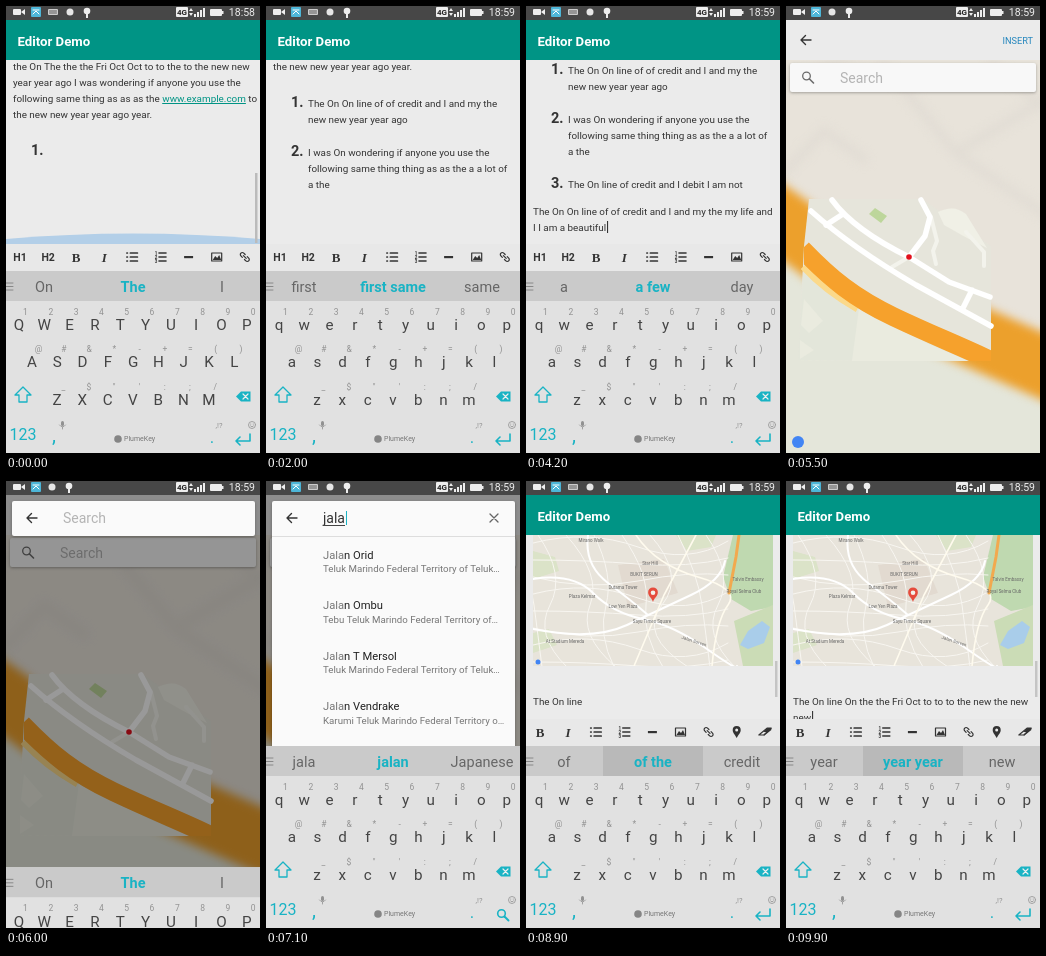
Recreate the animation shown at these times as an HTML page with a canvas. Size 254 by 447 pixels, loop 10 s.

```html
<!DOCTYPE html>
<html lang="en">
<head>
<meta charset="utf-8">
<title>Editor Demo</title>
<style>
html, body { margin: 0; width: 100%; height: 100%; overflow: hidden; background: #ebebeb; }
canvas { display: block; width: 100vw; height: 100vh; }
</style>
</head>
<body>
<canvas></canvas>
<script>
const W = 254, H = 447, LOOP = 10000, STEP = 100;
const TEAL = '#19b3c4', INK = '#333', GREY = '#929292';
const canvas = document.querySelector('canvas'), c = canvas.getContext('2d');
const dpr = window.devicePixelRatio || 1;
canvas.width = W * dpr;
canvas.height = H * dpr;

// ---- helpers ----
const clamp = v => Math.max(0, Math.min(1, v));
const span = (t, a, b) => clamp((t - a) / (b - a));

function rect(x, y, w, h, color, r = 0) {
  c.fillStyle = color;
  c.beginPath();
  c.roundRect(x, y, w, h, r);
  c.fill();
}
function dot(x, y, r, color) {
  c.fillStyle = color;
  c.beginPath();
  c.arc(x, y, r, 0, 7);
  c.fill();
}
function ring(x, y, r, color, width) {
  c.strokeStyle = color;
  c.lineWidth = width;
  c.beginPath();
  c.arc(x, y, r, 0, 7);
  c.stroke();
}
function fill(d, color) {
  c.fillStyle = color;
  c.fill(new Path2D(d));
}
function stroke(d, color, width = 1) {
  c.strokeStyle = color;
  c.lineWidth = width;
  c.stroke(new Path2D(d));
}
function at(x, y, draw, angle = 0, scale = 1) {
  c.save();
  c.translate(x, y);
  c.rotate(angle * Math.PI / 180);
  c.scale(scale, scale);
  draw();
  c.restore();
}
// y is the middle of the capital letters
function text(s, x, y, size, color = INK, align = 'left', style = '', family = 'Roboto, sans-serif') {
  c.font = `${style} ${size}px ${family}`;
  c.fillStyle = color;
  c.textAlign = align;
  c.fillText(s, x, y + size * .355);
}
const label = (s, x, y, angle, size = 6.5, color = '#555') =>
  at(x, y, () => text(s, 0, 0, size, color, 'center'), angle);
function clip(x, y, w, h, draw) {
  c.save();
  c.beginPath();
  c.rect(x, y, w, h);
  c.clip();
  draw();
  c.restore();
}
function typed(s, t, a, b) {
  const words = s.match(/\S+\s*/g);
  return words.slice(0, Math.round(words.length * span(t, a, b))).join('');
}

// ---- status bar ----
function statusBar(t, keys) {
  rect(0, 0, W, 14, '#474747');
  rect(7, 3, 8, 6, '#eee', 1);
  fill('M15 6l4-3v6z', '#eee');
  rect(25, 1, 10, 10, '#4db6d8', 1);
  stroke('M27 8l3-3 3 3M27 4h6', '#fff');
  if (keys) {
    rect(42, 3, 10, 6, '#ccc', 1);
    stroke('M43.500 5h7M43.500 7h7', '#333', .7);
  }
  const x = keys ? 64 : 46;
  dot(x, 6, 3.5, '#e6e6e6');
  dot(x + 17, 5, 3.3, '#eee');
  rect(x + 16, 6, 2, 6, '#eee');
  rect(170, 1, 12, 10, '#eee', 1);
  text('4G', 176, 6, 8, '#222', 'center', 'bold');
  fill('M183 5l2-3 2 3zM183 7h4l-2 3z', '#eee');
  for (let i = 0; i < 4; i++) rect(188 + i * 3, 8 - i * 2, 2, 3 + i * 2, '#eee');
  rect(204, 3, 12, 7, '#eee', 1);
  rect(216, 5, 1.5, 3, '#eee');
  text(t < 1200 ? '18:58' : '18:59', 249, 6, 10.5, '#eee', 'right');
}

// ---- keyboard ----
const hints = [
  ['On', 'The', 'I'], ['year', 'year year', 'new'], ['of', 'of the', 'credit'],
  ['a', 'a few', 'day'], ['first', 'first same', 'same'], ['and', 'I and', 'my']
];
const keyRows = [
  ['qwertyuiop', '1234567890', 13, 319],
  ['asdfghjkl', '@#&*-+=()', 26, 356],
  ['zxcvbnm', '_$"\':;/', 51, 394]
];
function lens(x, y, color, width) {
  ring(x - 1.5, y - 1.5, 3.8, color, width);
  at(x, y, () => stroke('M1.500 1.500L5.500 5.500', color, width + .3));
}
function keyboard(words, caps, { search = false, pressed = false } = {}) {
  rect(0, 265, W, 182, '#e1e1e1');
  rect(0, 265, W, 30, '#cacaca');
  if (pressed) rect(77, 265, 100, 30, '#b9b9b9');
  stroke('M0 277h7M0 280.500h7M0 284h7', '#888');
  words.forEach((s, i) =>
    text(s, 38 + i * 89, 281, 14.5, i == 1 ? TEAL : '#666', 'center', i == 1 ? 'bold' : ''));
  for (const [keys, alts, x, y] of keyRows)
    [...keys].forEach((k, i) => {
      const kx = x + i * 25.3;
      text(caps ? k.toUpperCase() : k, kx, y, 15.2, '#444', 'center');
      text(alts[i], kx + 6.5, y - 13.3, 8.5, GREY, 'center');
    });
  stroke('M17 381l-8 8h4v7h8v-7h4z', TEAL, 1.3);
  fill('M230 390.500l5-5h9.500v10h-9.500z', TEAL);
  stroke('M237 388l5 5M242 388l-5 5', '#eee', 1.2);
  text('123', 17, 428, 16, TEAL, 'center');
  text(',', 48, 429, 20, TEAL, 'center');
  rect(55, 415, 3, 5, GREY, 1.5);
  stroke('M53.500 419q3 4 6 0M56.500 421v2', GREY, .8);
  dot(112, 433, 3.8, '#858585');
  text('PlumeKey', 118, 433, 7, '#777');
  text('.', 206, 431, 17, TEAL, 'center');
  text(',!?', 213, 419, 7.5, GREY, 'center');
  ring(246, 419, 3.5, GREY, .8);
  stroke('M244.500 420q1.500 2 3 0M244.700 418v.2M247.300 418v.2', GREY, .8);
  if (search) lens(237, 434, TEAL, 1.6);
  else stroke('M244 428v7h-14m4-4l-4 4 4 4', TEAL, 1.6);
}

// ---- editor ----
const SERIF = 'Liberation Serif, serif';
const tools = [
  () => text('H1', 0, 0, 10.5, INK, 'center', 'bold'),
  () => text('H2', 0, 0, 10.5, INK, 'center', 'bold'),
  () => text('B', 0, 0, 13, INK, 'center', 'bold', SERIF),
  () => text('I', 0, 0, 13, INK, 'center', 'italic bold', SERIF),
  () => stroke('M-2-4h7M-2 0h7M-2 4h7M-5.500-4h.5M-5.500 0h.5M-5.500 4h.5', INK, 1.7),
  () => {
    stroke('M-1.500-4h7M-1.500 0h7M-1.500 4h7', INK, 1.6);
    ['1', '2', '3'].forEach((n, i) => text(n, -4.5, i * 4 - 4, 4.5, INK, 'center', 'bold'));
  },
  () => rect(-4.5, -1, 9, 2.2, INK),
  () => {
    stroke('M-5-4h10v8h-10z', INK, 1.2);
    fill('M-4 3l2.500-4 2 2 2-3 2 5z', INK);
  },
  () => at(0, 0, () =>
    stroke('M-1.500-2h-2a2 2 0 0 0 0 4h2M1.500-2h2a2 2 0 0 1 0 4h-2M-2 0h4', INK, 1.2), 45),
  () => {
    fill('M0 6C-2 2-4 1-4-2a4 4 0 0 1 8 0C4 1 2 2 0 6z', INK);
    dot(0, -2, 1.5, '#eee');
  },
  () => {
    fill('M-1.500 0l4-4h4l-4 4z', INK);
    stroke('M-6 3l8.500-7h4L-1 3z', INK, 1.1);
    fill('M-1 3l7.500-7v2L-1 4z', INK);
  }
];
function toolbar(shift) {
  rect(0, 238, W, 27, '#e8e8e8');
  tools.forEach((draw, i) => at(14 + i * 28.1 - shift, 251, draw));
}
function appBar() {
  rect(0, 14, W, 40, '#009485');
  text('Editor Demo', 11.5, 35, 13.2, '#fff', 'left', 'bold');
}
// Draws text lines and returns where the caret belongs
function lines(s, x, y) {
  let caret = [x, y];
  s.split('\n').forEach((line, i) => {
    text(line, x, y + i * 16, 9.9);
    caret = [x + c.measureText(line).width + 1, y + i * 16];
  });
  return caret;
}
const blocks = [
  [100, 950, 145, 'The On On line of of credit and I and my the\nnew new year year ago', 1],
  [1100, 2000, 194, 'I was On wondering if anyone you use the\nfollowing same thing thing as as the a a lot of\na the', 2],
  [2200, 2900, 259, 'The On line of credit and I debit I am not', 3],
  [3100, 4200, 286, 'The On On line of of credit and I and my the my life and\nI I am a beautiful', 0]
];
function drawCaret(t, [x, y]) {
  if (Math.floor(t / 830) % 2) rect(x, y - 6, 1, 12, '#222');
}
function noteText(t) {
  const scroll = t < 1000 ? 0 : t < 3000 ? 48 : 81;
  let caret, caps = true;
  c.save();
  c.translate(0, -scroll);
  lines('the On The the the Fri Oct Oct to to the to the new new\nyear year ago I was wondering if anyone you use the', 7, 60);
  const before = 'following same thing as as as the ', link = 'www.example.com';
  text(before, 7, 92, 9.9);
  const x = 7 + c.measureText(before).width;
  text(link, x, 92, 9.9, '#009485');
  const w = c.measureText(link).width;
  rect(x, 97, w, 1, '#009485');
  text(' to', x + w, 92, 9.9);
  text('the new new year year ago year.', 7, 108, 9.9);
  blocks.forEach(([a, b, y, s, n], i) => {
    if (i && t < a - 100) return;
    if (n) text(n + '.', 25, y - 1, 14.5, INK, 'left', 'bold');
    const part = typed(s, t, a, b);
    caps = !part;
    caret = lines(part, n ? 42 : 7, y);
  });
  drawCaret(t, caret);
  c.restore();
  if (t < 300) {
    c.globalAlpha = 1 - t / 300;
    fill('M0 233Q127 222 254 233V238H0z', '#b3cfe8');
    rect(249, 167, 2.5, 70, '#bbb');
    c.globalAlpha = 1;
  }
  return caps;
}
function pictureText(t) {
  clip(7, 54, 240, 131, cityMap);
  const part = typed('The On line On the the Fri Oct to to to the new the new\nnew', t, 8700, 9800);
  drawCaret(t, lines(part, 7, 220));
  rect(249, 180, 2.5, 36, '#c4c4c4');
  return !part;
}
function editor(t) {
  rect(0, 0, W, H, '#ebebeb');
  let caps;
  clip(0, 54, W, 184, () => caps = t < 6000 ? noteText(t) : pictureText(t));
  toolbar(56.2 * (t < 6000 ? span(t, 4200, 4500) : 1));
  keyboard(hints[Math.floor(t / 200) % hints.length], caps, { pressed: t % 200 >= 100 });
  appBar();
}

// ---- maps ----
function cityMap() {
  rect(7, 54, 240, 131, '#e8e4db');
  fill('M7 70l22 6 4 14-26 8zM150 54h40l-5 12-24 4zM7 152l16-4 8 16-24 8z', '#dbe3c8');
  fill('M207 54h40v72l-22 4-20-12-8-22z', '#bfd9b0');
  fill('M208 140l39-16v61h-30z', '#cbdcb6');
  fill('M222 150l14-10 8 6-6 16-16 6-8-4z', '#a9cdea');
  fill('M92 84l46-6 14 34-50 14z', '#e2dad0');
  for (let i = 0; i < 8; i++) {
    stroke(`M${i * 28 - 16} 54q${20 + i % 3 * 8} 40 ${24 - i % 2 * 12} 70t${8 + i % 3 * 9} 62`, '#f8f6f1', 1);
    stroke(`M7 ${62 + i * 17}q55 ${i % 3 * 14 - 14} 105 4t90-6`, '#f8f6f1', 1);
  }
  stroke('M7 98q40-6 60 14t50 26 64 30 30 17M62 54q-4 30 20 48t40 32M7 148q60 12 94-4t64-30 34-34', '#fff', 2);
  stroke('M110 54q20 30 62 42t30 28-16 61M170 54l-32 60-30 71', '#fffbee', 1.6);
  stroke('M213 54l-3 22-7 36', '#f2a94f', 3);
  [['Mirano Walk', 65, 59], ['Star Hill', 124, 82], ['BUKIT SERUN', 118, 93], ['Plaza Kelmar', 56, 115],
   ['Dutama Tower', 97, 106], ['Talvin Embassy', 222, 98], ['Low Yen Plaza', 97, 125],
   ['Sayu Times Square', 126, 140], ['At Stadium Mereda', 39, 160], ['Royal Selma Club', 218, 110]]
    .forEach(([s, x, y]) => label(s, x, y, 0, 4.5, '#666'));
  label('Jalan Sorven', 168, 160, 18, 4.5, '#666');
  pin(127, 121, .27);
  dot(12, 181, 2.5, '#4285f4');
}
function pin(x, y, s) {
  at(x, y, () => {
    fill('M0 0C-3-14-18-20-18-36a18 18 0 0 1 36 0C18-20 3-14 0 0z', '#e54b3c');
    dot(0, -34, 8.5, '#f3f0e9');
  }, 0, s);
}
function startMap(t) {
  rect(0, 54, W, 393, '#e8e3da');
  const zoom = .5 + .5 * span(t, 4700, 5400);
  at(123, 251, () => {
    c.translate(-123, -251);
    c.filter = 'blur(5px)';
    fill('M-400-60L0 225 254 375 800 640V900H-400z', '#e4e6da');
    stroke('M0 165l38-40 40 28M95 55l75 92 90-54M170 147l90 62M205 54l50 46M-10 82l80-35', '#e1dcd4', 8);
    stroke('M-400-60L0 218 60 264 130 305 254 359 800 600', '#eca02c', 62);
    c.filter = 'none';
    fill('M23 193H136L205 240V355L12 354 18 240z', '#e6e5db');
    fill('M18 255L70 300 205 355 12 354z', '#e3e6da');
    fill('M73 302l70 36 40 17H66zM18 293l19 22-14 12-8-8zM14 334l14 10-14 9z', '#eaebdf');
    c.lineCap = 'butt';
    stroke('M18 260q22 24 54 42', '#fbd98a', 9);
    clip(18, 190, 187, 165, () =>
      stroke('M16 243C45 273 68 292 108 311S170 338 210 357', '#f6a12c', 19));
    c.lineCap = 'round';
    fill('M152 206q16-8 28 2l21 34-20-10-23-13z', '#f0f0e6');
    stroke('M145 211l6 24-4 10 3 13M123 251l-17 10M180 226l18 20v14', '#f3f3ec', 4);
    stroke('M25 205q40 36 105 74l75 41M46 194q22 30 77 57l40 25 41 15M57 208l-17 11M186 284l-10 20M135 194l9 17-5 19-16 21', '#fff', 5.5);
    fill('M89 202l12 8-6 7-12-9z', '#bdd69b');
    dot(123, 251, 2.8, '#e2101c');
  }, 0, zoom);
}
function streetMap() {
  rect(0, 54, W, 393, '#f0eee7');
  fill('M140 180l50-20 64 8v30l-85 58-22-8z', '#e7e7dc');
  fill('M172 328l82-40v50l-76 38z', '#eae6de');
  // minor streets
  stroke('M105 116L185 104 250 122M112 142L215 128 240 134M112 165L195 152M138 112l6 46M160 108l7 46M186 104l6 46M212 110l3 42M236 118l-6 50', '#fff', 3.5);
  stroke('M0 190l62 75M28 168l58 70M62 118l34 40M0 255l52-34 40-40M5 292l60-38 42-32M44 150l50-38M0 228l28 36M100 220q30 12 30 40t-18 24', '#fff', 4);
  stroke('M0 350l90-22M0 392l40 55M22 345l36 78M0 425l96-66M185 300l30 62 39-18M194 400l60-28M200 430l54-22', '#fff', 3.5);
  // wide roads
  stroke('M0 322L60 303 125 285 172 258 254 195M127 245L150 270 163 320 178 390 195 447M0 126L46 110 112 94 180 92 254 98', '#fff', 9);
  stroke('M40 447L90 402 140 363 175 345 254 300M83 301L137 366M30 120L85 192 127 245', '#fff', 7);
  stroke('M0 160L30 122 62 92M0 128L46 112 100 97M0 319L60 300 125 282M0 325L60 306 125 288M90 299l50 64', '#d9812f', 1.5);
  stroke('M100 94L180 90 254 96M100 98L180 94 254 100M125 282L172 255 254 192M125 288L172 261 254 199', '#6eaf52', 1.6);
  stroke('M125 245l22 27 13 50 15 68 17 57M131 243l22 26 13 50 15 68 18 60M113 96l8 56-30 14M122 286q18-16 40-18M150 270q-8 14-28 17M152 300q3-30 28-46', '#67ae4d', 1.7);
  stroke('M28 120L58 157 85 192', '#cf5a2e', 1.6);
  stroke('M85 192L127 245q14 16 9 28t-14 13M130 240l-34-44', '#b9131f', 2);
  stroke('M45 447L90 400 140 360 175 342 254 298M52 447L92 404 142 365 177 348 254 303M82 303L136 367M62 420l14 22', '#bf1a24', 1.8);
  stroke('M88 302l50 62M180 342l70-38', '#e08a38', 1);
  rect(158, 341, 7, 8, '#35a5dc', 1);
  rect(186, 431, 7, 8, '#35a5dc', 1);
  ring(250, 370, 4, '#8a8a8a', 1);
  label('Jalan Beluk', 33, 125, -24);
  label('Medan Ombu', 97, 156, 42, 6, '#888');
  label('Jalan Ombu', 76, 192, 50);
  label('Jalan Talu', 115, 130, 80, 5.5);
  label('Jalan Hirai', 210, 131, 85, 5.5);
  label('Jalan Dolang', 32, 222, 48);
  label('Lorong Felton Mardier', 61, 240, -31);
  label('Jalan Kampung Sorven', 207, 228, -37, 7);
  label('Jalan Dato Verimal', 42, 306, -17, 7.3);
  label('Jalan Besut', 232, 313, -28);
  label('Jalan Beluk', 24, 420, 50);
  label('Jalan Beluk', 78, 414, -38);
  label('Melodra Grove', 213, 365, 0, 8);
  label('Theme Park', 216, 376, 0, 8);
  pin(128, 250, 1);
}

// ---- place picker ----
const arrow = (x, y) => stroke(`M${x + 5} ${y}h-10m4.500-4.500l-4.500 4.500 4.500 4.500`, INK, 1.4);
const cross = (x, y) => stroke(`M${x - 4} ${y - 4}l8 8m0-8l-8 8`, '#666', 1.3);
function shadow(draw) {
  c.save();
  c.shadowColor = 'rgba(0,0,0,.3)';
  c.shadowBlur = 3 * dpr;
  c.shadowOffsetY = dpr;
  draw();
  c.restore();
}
const places = [
  ['n Orid', 'Teluk Marindo Federal Territory of Teluk…'],
  ['n Ombu', 'Tebu Teluk Marindo Federal Territory of…'],
  ['n T Mersol', 'Teluk Marindo Federal Territory of Teluk…'],
  ['n Vendrake', 'Karumi Teluk Marindo Federal Territory o…']
];
function picker(t) {
  const chosen = t >= 7400;
  clip(0, 54, W, 393, () => chosen ? streetMap() : startMap(t));
  dot(12, 436, 6, '#4285f4');
  rect(0, 14, W, 40, '#ebebeb');
  arrow(20, 34);
  text('INSERT', 247, 35, 9.2, '#2486bd', 'right');
  shadow(() => rect(4, 57, 246, 29, '#f8f8f8', 2));
  lens(22, 71.5, '#6a6a6a', 1.3);
  text(chosen ? 'Jalan Ombu' : 'Search', 54, 72.5, 14, chosen ? '#444' : '#b4b4b4');
  if (chosen) cross(230, 72);
  if (t >= 5900 && !chosen) searchPanel(t);
  const alpha = Math.min(span(t, 7500, 7800), 1 - span(t, 8300, 8500));
  if (alpha > 0) {
    c.globalAlpha = alpha;
    rect(55, 373, 144, 30, '#5f5f5f', 15);
    text('Location,Jalan Ombu selected', 127, 388, 9.3, '#fff', 'center');
    c.globalAlpha = 1;
  }
}
function searchPanel(t) {
  rect(0, 14, W, H, 'rgba(0,0,0,.4)');
  const query = 'jala'.slice(0, [6400, 6600, 6800, 7000].filter(k => t >= k).length);
  const found = query.length > 1;
  shadow(() => rect(6, 20, 243, found ? 250 : 35, '#fafafa', 2));
  arrow(26, 37);
  text(query || 'Search', 57, 37, 14, query ? INK : '#b4b4b4');
  if (query) {
    const w = c.measureText(query).width;
    rect(57, 44, w, 1, '#444');
    if (t % 1000 < 500) rect(58 + w, 30, 1, 14, TEAL);
    cross(228, 37);
  }
  if (found) {
    rect(6, 55, 243, 1, '#ddd');
    places.forEach(([name, area], i) => {
      const y = 74 + i * 50.5;
      text('Jala', 57, y, 11.2, '#777');
      text(name, 57 + c.measureText('Jala').width, y, 11.2, '#222');
      text(area, 57, y + 14, 9.7, '#777');
    });
  }
  const down = 182 * (1 - span(t, 5900, 6200));
  at(0, down, () =>
    keyboard(query ? ['jala', 'jalan', 'Japanese'] : hints[0], !query, { search: true }));
}

// ---- loop ----
function draw(t) {
  c.setTransform(dpr, 0, 0, dpr, 0, 0);
  c.lineCap = c.lineJoin = 'round';
  const picking = t >= 4600 && t < 8500;
  if (picking) picker(t);
  else editor(t);
  statusBar(t, !picking || (t >= 6100 && t < 7400));
}
const start = performance.now();
function tick() {
  const t = (performance.now() - start) % LOOP;
  draw(Math.floor(t / STEP) * STEP);
  requestAnimationFrame(tick);
}
tick();
</script>
</body>
</html>
```
